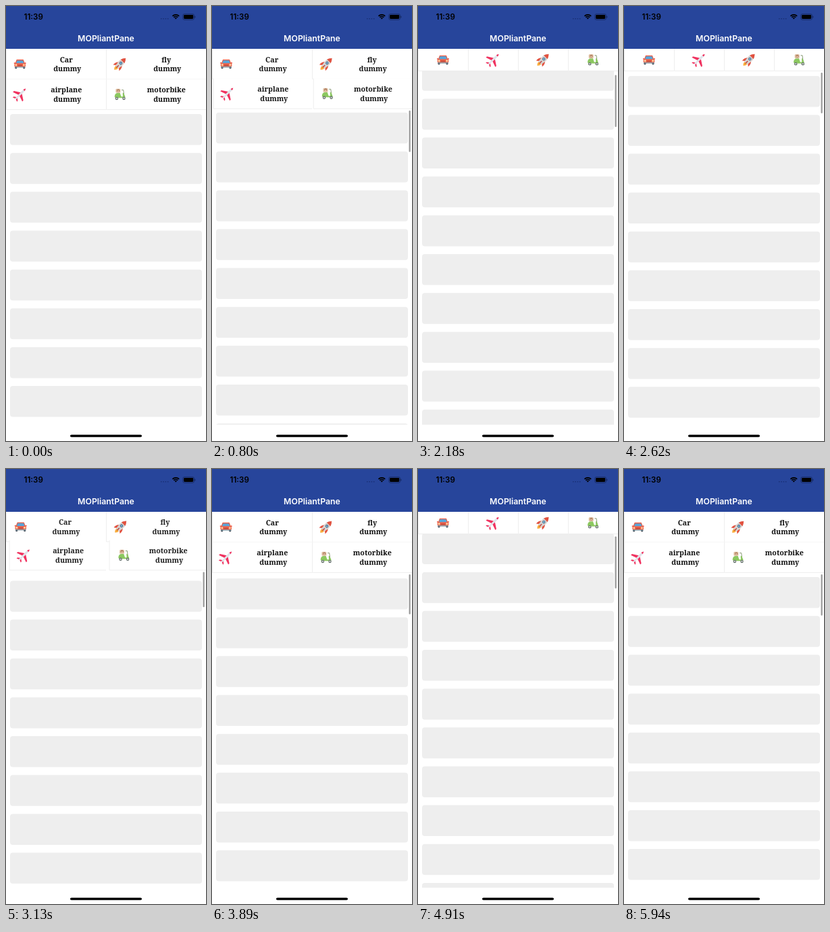
An HTML page with a canvas for the animation above (5970 ms loop, 296 px wide and 640 px high).

```html
<!DOCTYPE html>
<html lang="en">
<head>
<meta charset="utf-8">
<title>Collapsing header</title>
<style>
html, body { margin: 0; width: 100%; height: 100%; overflow: hidden; background: #fff; }
canvas { display: block; width: 296px; height: 640px; }
</style>
</head>
<body>
<canvas id="stage"></canvas>
<script>
const W = 296, H = 640, LOOP = 5970, STEP = 115, PHASE = 75;
const NAV = 63, LIST_END = 616, PITCH = 57.16;
const CONTENT = 3540, OPEN_VIEW = 464;
const canvas = document.getElementById('stage');
const ctx = canvas.getContext('2d');
const ratio = window.devicePixelRatio || 1;
canvas.width = W * ratio;
canvas.height = H * ratio;

const lerp = (a, b, k) => a + (b - a) * k;

function ease(t, start, end) {
  const u = Math.min(1, Math.max(0, (t - start) / (end - start)));
  return u * u * (3 - 2 * u);
}

// 0 = open header with labels, 1 = one row of icons
const collapse = t => ease(t, 700, 1420) - ease(t, 2870, 3100)
  + ease(t, 4000, 4580) - ease(t, 5260, 5800);

// Each drag is followed by a pull past the top and a release.
const scrollAt = t =>
  36.5 * ease(t, 700, 1420) - 45.5 * ease(t, 1690, 2940) + 9 * ease(t, 3300, 4120)
  + 18 * ease(t, 4000, 4600) - 24 * ease(t, 4600, 5270) + 6 * ease(t, 5400, 5900);

function box(x, y, w, h, r, color) {
  ctx.fillStyle = color;
  ctx.beginPath();
  ctx.roundRect(x, y, w, h, r);
  ctx.fill();
}

function disc(x, y, r, color) {
  ctx.fillStyle = color;
  ctx.beginPath();
  ctx.arc(x, y, r, 0, 7);
  ctx.fill();
}

function shape(path, color) {
  ctx.fillStyle = color;
  ctx.fill(new Path2D(path));
}

function line(path, color, width) {
  ctx.strokeStyle = color;
  ctx.lineWidth = width;
  ctx.stroke(new Path2D(path));
}

function label(text, x, y, font, color) {
  ctx.font = font;
  ctx.fillStyle = color;
  ctx.textAlign = 'center';
  ctx.fillText(text, x, y);
}

function mirrored(draw) {
  for (const side of [-1, 1]) {
    ctx.save();
    ctx.scale(side, 1);
    draw();
    ctx.restore();
  }
}

// Icons are drawn around their own centre.
function car() {
  mirrored(() => {
    box(4.5, 4, 3, 3, 1, '#4a5560');
    box(6.5, -2.2, 2.5, 1.8, .8, '#e8553f');
  });
  shape('M-5-6.5H5L7.3-.5H-7.3Z', '#ea5a43');
  shape('M-4.4-5.2H4.4L5.9-.8H-5.9Z', '#5aa3d6');
  box(-8.3, -1, 16.6, 5.4, 2, '#f0624a');
  box(-3.3, 1.2, 6.6, 1.6, .6, '#b5483c');
  box(-8, 3.6, 16, 1.6, .7, '#8b959e');
  mirrored(() => disc(5.8, 1.4, 1.3, '#ffe6b0'));
}

function rocket() {
  ctx.rotate(Math.PI / 4);
  shape('M-2.5 6Q-3 9.5 0 12Q3 9.5 2.5 6Z', '#f8ac3c');
  mirrored(() => shape('M3-1Q7 2 6.3 8L2.5 5Z', '#e2513f'));
  shape('M0-12Q4.8-7 4 0L3 6.5H-3L-4 0Q-4.8-7 0-12Z', '#d5d2d0');
  shape('M0-12Q3-8.7 3.9-5.5H-3.9Q-3-8.7 0-12Z', '#e2513f');
  disc(0, -1.8, 2.2, '#4b6180');
  disc(0, -1.8, 1.3, '#79c3e3');
  box(-.7, 2.6, 1.4, 5, .7, '#bd3c36');
}

function airplane() {
  ctx.rotate(Math.PI / 4);
  mirrored(() => {
    shape('M1-3L9.8 2.8V5L1 2Z', '#f0325f');
    shape('M.8 6.3L4.3 9V10.8L.8 9.3Z', '#f0325f');
  });
  shape('M0-12Q1.8-9.5 1.6-5L.9 9.5H-.9L-1.6-5Q-1.8-9.5 0-12Z', '#dfe3ea');
  shape('M0-12Q1.2-10.5 1.5-8.3H-1.5Q-1.2-10.5 0-12Z', '#f0325f');
}

function scooter() {
  box(-6.3, -8.2, 7, 6, 1.5, '#dfc0a2');
  disc(-2.6, -5.6, 2, '#a9765a');
  disc(-2.6, -5, 1, '#f3d8bb');
  line('M2.5-6.5H5L6.3 4', '#8a9a78', 1);
  shape('M-8 4Q-8-1.5-4-2H0Q1 1 1.8 3.3H4.2L4-2H5.4L8 4.3L5 5.3H-6Z', '#8cc860');
  for (const x of [-4.8, 5.8]) {
    disc(x, 5.9, 2.2, '#5f6a66');
    disc(x, 5.9, 1.1, '#dfe3e0');
  }
}

const CELLS = [
  { col: 0, row: 0, name: 'Car', icon: car },
  { col: 0, row: 1, name: 'airplane', icon: airplane },
  { col: 1, row: 0, name: 'fly', icon: rocket },
  { col: 1, row: 1, name: 'motorbike', icon: scooter }
];

function drawCell({ col, row, name, icon }, p) {
  const w = lerp(148, 74, p), h = lerp(44.7, 32.5, p);
  ctx.save();
  ctx.translate(col * 148 + row * 74 * p, NAV + row * 44.7 * (1 - p));
  ctx.fillStyle = '#fff';
  ctx.fillRect(0, 0, w, h);
  line(`M.5 0V${h}H${w}`, '#eaeaea', .8);

  if (p < .98) {
    ctx.save();
    ctx.beginPath();
    ctx.rect(lerp(36, 54, p), 0, w - lerp(40, 58, p), h);
    ctx.clip();
    ctx.globalAlpha = 1 - p;
    const x = lerp(89.3, 61, p), font = '600 10.7px "Noto Serif", serif';
    label(name, x, h / 2 - 2.6, font, '#111');
    label('dummy', x + 1.4, h / 2 + 10.9, font, '#111');
    ctx.restore();
  }
  ctx.translate(lerp(20.7, 37, p), h / 2);
  icon();
  ctx.restore();
}

function drawList(bottom, scroll) {
  ctx.save();
  ctx.beginPath();
  ctx.rect(0, bottom, W, LIST_END - bottom);
  ctx.clip();
  for (let y = bottom + 6.6 - scroll; y < LIST_END; y += PITCH) {
    box(6, y, 284, 45.5, 4, '#eeeeee');
  }
  ctx.restore();
}

function drawScrollBar(bottom, scroll) {
  // Pulling past the top restores the open view and squeezes the bar.
  const view = scroll < 0 ? OPEN_VIEW : LIST_END - bottom;
  const length = view * view / CONTENT + Math.min(0, scroll);
  const top = bottom + 2.6 + Math.max(0, scroll) * view / CONTENT;
  box(291.5, top, 2.2, length, 1.1, '#999');
}

function drawBars() {
  ctx.fillStyle = '#27459b';
  ctx.fillRect(0, 0, W, NAV);
  label('MOPliantPane', 148, 51.5, '600 12.3px Inter, sans-serif', '#fff');
  label('11:39', 40.7, 20.3, '600 11.6px Inter, sans-serif', '#000');
  for (let i = 0; i < 4; i++) disc(229.8 + i * 3.3, 18.7, .8, '#172c6c');

  ctx.strokeStyle = '#000';
  ctx.lineWidth = 1.7;
  for (let r = 1.5; r < 8; r += 2.7) {
    ctx.beginPath();
    ctx.arc(251.3, 19.7, r, -Math.PI * .75, -Math.PI * .25);
    ctx.stroke();
  }
  ctx.strokeStyle = '#15285f';
  ctx.lineWidth = .8;
  ctx.beginPath();
  ctx.roundRect(261.7, 11.7, 16.8, 8.6, 2.4);
  ctx.stroke();
  box(263, 13, 14.2, 6, 1.4, '#000');
  box(279.3, 14.6, 1, 2.8, .5, '#15285f');
  box(95, 630.8, 106, 3.4, 1.7, '#000');
}

function render(time) {
  const held = PHASE + STEP * Math.floor((time - PHASE) / STEP);
  const p = collapse(held), scroll = scrollAt(held);
  const bottom = lerp(152.4, 95.5, p);
  ctx.setTransform(ratio, 0, 0, ratio, 0, 0);
  ctx.fillStyle = '#fff';
  ctx.fillRect(0, 0, W, H);
  drawList(bottom, scroll);
  CELLS.forEach(cell => drawCell(cell, p));
  if (held > 700) drawScrollBar(bottom, scroll);
  drawBars();
}

function loop(now) {
  render(now % LOOP);
  requestAnimationFrame(loop);
}
render(0);
requestAnimationFrame(loop);
</script>
</body>
</html>
```
